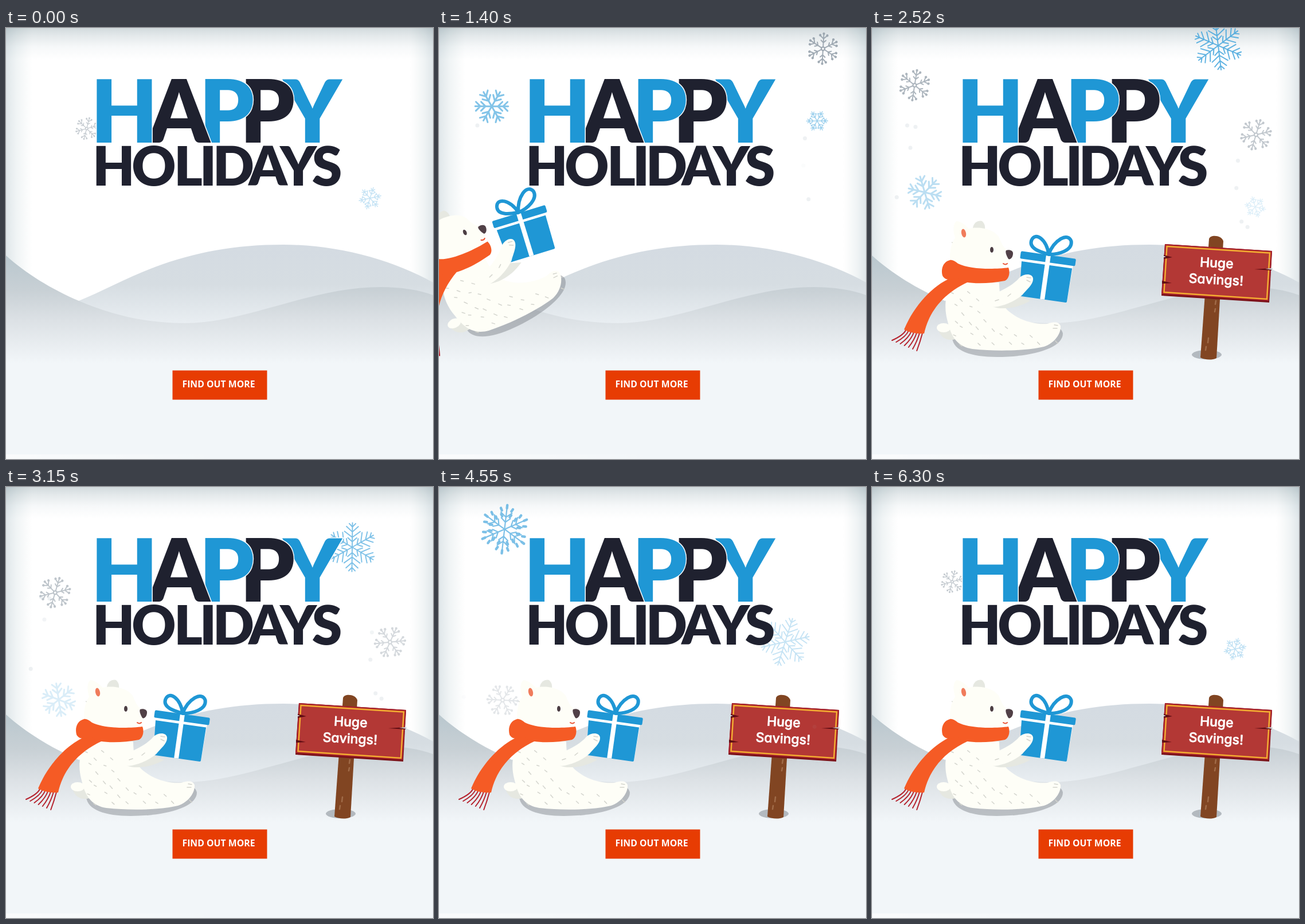
Animation, 745 px wide and 752 px high, one loop 6.37 s. Source, as an HTML page:

```html
<!DOCTYPE html>
<html lang="en">
<head>
<meta charset="utf-8">
<title>Happy Holidays</title>
<style>
html, body { margin: 0; width: 100%; height: 100%; overflow: hidden; background: #fff; }
svg { display: block; width: 745px; height: 752px; }
.title { font-family: Lato, sans-serif; font-weight: 900; text-anchor: middle; }
.outlined { stroke: #fff; stroke-width: 3; paint-order: stroke; }
.cta { font: 700 15.8px "Open Sans", sans-serif; fill: #fff; text-anchor: middle; }
.board { font: 500 23px Inter, sans-serif; font-feature-settings: "cv11"; fill: #fff; stroke: #fff; stroke-width: .6; stroke-linejoin: round; text-anchor: middle; }
.line { fill: none; stroke-linecap: round; stroke-linejoin: round; }
.edge { mix-blend-mode: multiply; }
</style>
</head>
<body>
<svg viewBox="0 0 745 752">
  <defs>
    <linearGradient id="top" x2="0" y2="1">
      <stop stop-color="#d2dadd"/><stop offset=".25" stop-color="#e4e9eb"/><stop offset=".6" stop-color="#f6f8f9"/><stop offset="1" stop-color="#fff"/>
    </linearGradient>
    <linearGradient id="side">
      <stop stop-color="#e0e7ea"/><stop offset=".4" stop-color="#f0f4f5"/><stop offset=".8" stop-color="#fbfcfc"/><stop offset="1" stop-color="#fff"/>
    </linearGradient>
    <linearGradient id="far" gradientUnits="userSpaceOnUse" x1="0" y1="378" x2="0" y2="516">
      <stop stop-color="#d4dbe2"/><stop offset=".5" stop-color="#d6dde2"/><stop offset="1" stop-color="#e9eef2"/>
    </linearGradient>
    <linearGradient id="near" gradientUnits="userSpaceOnUse" x1="0" y1="397" x2="0" y2="585">
      <stop stop-color="#b9c7ce"/><stop offset=".32" stop-color="#c8d0d5"/><stop offset=".6" stop-color="#dce1e5"/><stop offset="1" stop-color="#f2f6f9"/>
    </linearGradient>
    <linearGradient id="foot">
      <stop stop-color="#fff" stop-opacity=".6"/><stop offset="1" stop-color="#fff" stop-opacity="0"/>
    </linearGradient>
  </defs>

  <rect width="745" height="752" fill="#fff"/>
  <rect class="edge" width="745" height="55" fill="url(#top)"/>
  <rect class="edge" width="46" height="600" fill="url(#side)"/>
  <rect class="edge" width="40" height="600" fill="url(#side)" transform="matrix(-1 0 0 1 745 0)"/>

  <path fill="url(#far)" d="M127 476C165 461 210 436 260 417C330 391 400 378 484 378C580 378 675 405 745 444V530H127Z"/>
  <path fill="url(#near)" d="M0 397C34 428 80 456 127 476C185 501 245 515 312 515C420 515 530 452 654 452C690 452 720 457 745 466V752H0Z"/>
  <rect y="744" width="380" height="8" fill="url(#foot)"/>

  <g id="snow"></g>
  <g id="title" class="title"></g>

  <g id="bear">
    <path fill="#6b7078" fill-opacity=".4" d="M140 541C142 563 172 574 218 574C275 574 333 560 333 533C331 526 328 523 320 523L160 535Z"/>
    <path fill="#e6e8e1" d="M116 527C121 543 134 547 149 542L138 519Z"/>
    <ellipse cx="125" cy="523" rx="12" ry="8" fill="#fefef7"/>
    <path fill="#fefef7" d="M150 440C128 452 124 485 132 512C138 540 150 556 175 560C220 565 270 563 300 556C320 549 330 532 329 520C326 511 315 513 306 516C285 518 259 510 245 499C232 490 222 480 222 444Z"/>
    <g id="fur" class="line" stroke="#d3d4cd" stroke-width="1.5"></g>
    <path fill="#e6e8e1" d="M176 349C177 339 186 335 192 337C198 342 198 350 196 354Z"/>
    <path fill="#fefef7" d="M140 418C133 400 136 380 145 366C140 350 143 338 148 337C156 338 164 344 168 350C190 345 215 352 222 366C227 380 232 386 240 390C243 400 240 412 228 418L200 427 150 430Z"/>
    <ellipse cx="160" cy="358" rx="4" ry="7.5" fill="#f07c5c" transform="rotate(-12 160 358)"/>
    <ellipse cx="209" cy="387" rx="3" ry="5" fill="#4c3e44"/>
    <path fill="#514047" d="M234 388C240 386 247 389 246 394C246 400 241 405 238 403C235 398 232 391 234 388Z"/>
    <path class="line" stroke="#ea5334" stroke-width="2" d="M229 411Q233 414 236 411"/>
    <g id="fringe" class="line" stroke="#b5232e" stroke-width="2"></g>
    <path fill="#f55b25" d="M150 432C115 440 75 480 56 526C66 532 80 534 91 533C98 500 120 465 168 443Z"/>
    <path fill="#f55b25" d="M136 405C124 408 120 420 123 432C127 440 136 441 148 436C160 448 200 447 232 441C240 437 241 425 238 418C215 421 172 422 150 411C145 407 140 404 136 405Z"/>
    <path fill="#e6e8e1" d="M206 485C230 494 258 487 276 476L256 468Z"/>
    <g transform="translate(308 396) rotate(8)">
      <path fill="#fff" d="M-45 10H45L43 77H-42Z"/>
      <rect x="-48.500" width="97" height="13" rx="2.5" fill="#1f97d5"/>
      <path fill="#1f97d5" d="M-45 17.500H44L43 76Q43 78 41 78H-39Q-41 78-41 76Z"/>
      <path fill="#fff" d="M-4 0H4V78H-4Z"/>
      <path class="line" stroke="#1f97d5" stroke-width="6" d="M0-1C-14-3-36-6-33-21C-29-38-6-26 0-1C6-27 28-45 36-29C40-14 18-3 0-1"/>
    </g>
    <path fill="#fefef7" d="M190 470C210 466 240 455 258 435C266 428 280 428 281 437C282 447 270 456 262 466C245 480 222 488 205 487C192 486 186 478 190 470Z"/>
    <path class="line" stroke="#d3d4cd" stroke-width="1.500" d="M270 435l7 1M270 440l6 3M215 476l6-2M237 468l5-4M318 518l6 1M316 524l7 0"/>
  </g>

  <g id="sign">
    <ellipse cx="584" cy="570" rx="26" ry="8" fill="#b3b9bf"/>
    <path fill="#814522" d="M588 368C590 360 610 361 613 372L601 576C593 580 580 579 573 575Z"/>
    <path class="line" stroke="#a06b48" stroke-width="2.500" d="M600 476l-1 6M599 490l-1 5M587 541l-1 8M583 556l-1 6"/>
    <path fill="#7b1119" d="M511 377L698 389 693 479 505 467Z"/>
    <path fill="#a9242b" d="M511 377L698 389 692 476 505 464Z"/>
    <path fill="#b33835" stroke="#f4ad31" stroke-width="2.500" d="M514.500 381L694 392.500 689 473 509.500 461Z"/>
    <path fill="#5f0d13" d="M509 396l15 4-15 3ZM506 441l17 4-17 1ZM697 423l-30-2 30-2Z"/>
    <path fill="#d6dde2" d="M699 419l-13 1 13 2ZM506 397l7 2-7 2Z"/>
    <text class="board" transform="translate(601 418) rotate(3)">Huge</text>
    <text class="board" transform="translate(600 447) rotate(3)">Savings!</text>
  </g>

  <g id="dots" fill="#bcc8d0"></g>
  <rect x="290.500" y="597.500" width="165" height="51" fill="#e73c03"/>
  <text class="cta" x="371" y="627.300">FIND OUT MORE</text>
</svg>
<script>
const STEP = 70, LOOP = 6370;
const BLUE = '#1f97d5', DARK = '#1f212f', ICE = '#3ea3dc', GRAY = '#8f9ba6';
const $ = id => document.getElementById(id);
const clamp = v => Math.min(1, Math.max(0, v));

function add(parent, tag, attrs, text) {
  const el = document.createElementNS('http://www.w3.org/2000/svg', tag);
  for (const k in attrs) el.setAttribute(k, attrs[k]);
  if (text) el.textContent = text;
  parent.append(el);
  return el;
}

let seed = 7;
function random(lo, hi) {
  seed = seed * 16807 % 2147483647;
  return lo + (hi - lo) * seed / 2147483647;
}

// Later letters lie underneath earlier ones.
function letters(word, centers, y, size, attrs, fill) {
  const box = add($('title'), 'g', { 'font-size': size, ...attrs });
  for (let i = word.length - 1; i >= 0; i--)
    add(box, 'text', { x: centers[i], y, fill: fill(i) }, word[i]);
}
letters('HAPPY', [206.5, 302, 385, 456, 534.5], 200, 151, { class: 'outlined' }, i => i % 3 && i < 4 && i !== 2 ? DARK : i === 3 ? DARK : BLUE);
letters('HOLIDAYS', [188, 258, 318, 352.5, 397, 457, 510, 560], 275, 95, {}, () => DARK);

for (let i = 0; i < 7; i++)
  add($('fringe'), 'path', { d: `M${59 + i * 4.8} ${527 + i}q-4 ${9 + i} ${-24 + i * 2.4} ${18 + i * 2}` });

// Staggered rows of fur that widen towards the legs.
for (let y = 458, row = 0; y < 552; y += 13, row++)
  for (let x = 142 + row % 2 * 13; x < 195 + Math.max(0, y - 500) * 2.6; x += 27)
    add($('fur'), 'path', { d: `M${x + random(-4, 4)} ${y + random(-4, 4)}l4 ${random(1, 5)}` });
for (let y = 374; y < 408; y += 10)
  add($('fur'), 'path', { d: `M${random(139, 148)} ${y}l4 4` });

// One arm of each flake type as [path, width] strokes, 100 units long.
const ARMS = {
  chevron: [['M0 0V-96M-26-92L0-66 26-92M-26-62L0-36 26-62', 10]],
  blob: [['M0-12V-90M-22-82L0-62 22-82M-15-52L0-38 15-52', 7], ['M0-94V-93M-22-84v1M22-84v1', 15], ['M0-12L10-6', 8]],
  fern: [['M0 0V-99M-13-96L0-82 13-96M-24-84L0-62 24-84M-32-64L0-40 32-64M-18-38L0-22 18-38', 4.5]],
  leaf: [['M0 0V-84M-22-66L0-48 22-66M-18-44L0-28 18-44', 5], ['M0-96V-84M-24-82l5 9M24-82l-5 9M-20-58l5 8M20-58l-5 8', 10]],
  star: [['M0 0V-98M-17-86L0-68 17-86M-28-62L0-36 28-62L0-72-28-62', 7]]
};

// born is the time at the top edge; every flake falls, drifts, turns and fades evenly.
const flakes = [
  { type: 'chevron', r: 30, x: 92, born: 380, life: 3500, turn: 18 },
  { type: 'star', r: 19, x: 650, born: 190, life: 2900, turn: 15, drift: .008 },
  { type: 'blob', r: 28, x: 670, born: 1130, life: 3500 },
  { type: 'blob', r: 28, x: 61, born: 1775, life: 3800, drift: .018 },
  { type: 'fern', r: 43, x: 604, born: 2260, life: 3400, turn: -10, speed: .118 },
  { type: 'leaf', r: 44, x: 105, born: 4000, life: 2200, drift: .017 },
  { type: 'blob', r: 20, x: 125, born: 5160, life: 2600, drift: .013, speed: .145 },
  { type: 'star', r: 20, x: 600, born: 4907, life: 2200, drift: .024, speed: .203 }
];
for (const f of flakes) {
  f.el = add($('snow'), 'g', { class: 'line', stroke: f.type === 'blob' ? GRAY : ICE });
  for (let a = 0; a < 360; a += 60)
    for (const [d, w] of ARMS[f.type]) add(f.el, 'path', { d, 'stroke-width': w, transform: `rotate(${a})` });
}

function fall({ el, r, x, born, life, turn = 0, drift = 0, speed = .134 }, t) {
  const early = 500;
  const age = (t - born + early + LOOP) % LOOP - early;
  el.setAttribute('opacity', .9 * clamp(1 - age / life));
  el.setAttribute('transform', `translate(${x + drift * age} ${speed * age}) rotate(${turn + age * .012}) scale(${r / 100})`);
}

// Faint specks sink slowly along both sides.
const specks = Array.from({ length: 8 }, (_, i) => ({
  el: add($('dots'), 'circle', { r: 3.5, cx: i % 2 ? random(632, 658) : random(38, 76) }),
  y: random(90, 280) + i % 2 * 60,
  born: random(600, 1800)
}));

function sink({ el, y, born }, t) {
  const age = t - born;
  el.setAttribute('cy', y + age * .035);
  el.setAttribute('opacity', .25 * clamp(age / 400) * clamp((3000 - age) / 600));
}

// Glides into place; the tilt holds until the remaining way drops below `hold`.
function glide(id, { from, to, power, dx, dy, tilt, hold, pivot }, t) {
  const left = (1 - clamp((t - from) / (to - from))) ** power;
  const angle = tilt * Math.min(1, left / hold);
  $(id).setAttribute('transform', `translate(${dx * left} ${dy * left}) rotate(${angle} ${pivot})`);
}
const bear = { from: 560, to: 1960, power: 1.3, dx: -390, dy: -171, tilt: -25, hold: .3, pivot: '235 500' };
const sign = { from: 1750, to: 2310, power: 1, dx: 152, dy: -706, tilt: 15.3, hold: .625, pivot: '587 577' };

function draw(t) {
  glide('bear', bear, t);
  glide('sign', sign, t);
  for (const f of flakes) fall(f, t);
  for (const s of specks) sink(s, t);
}

const start = performance.now();
function tick() {
  const t = (performance.now() - start) % LOOP;
  draw(Math.floor(t / STEP) * STEP);
  requestAnimationFrame(tick);
}
tick();
</script>
</body>
</html>
```
